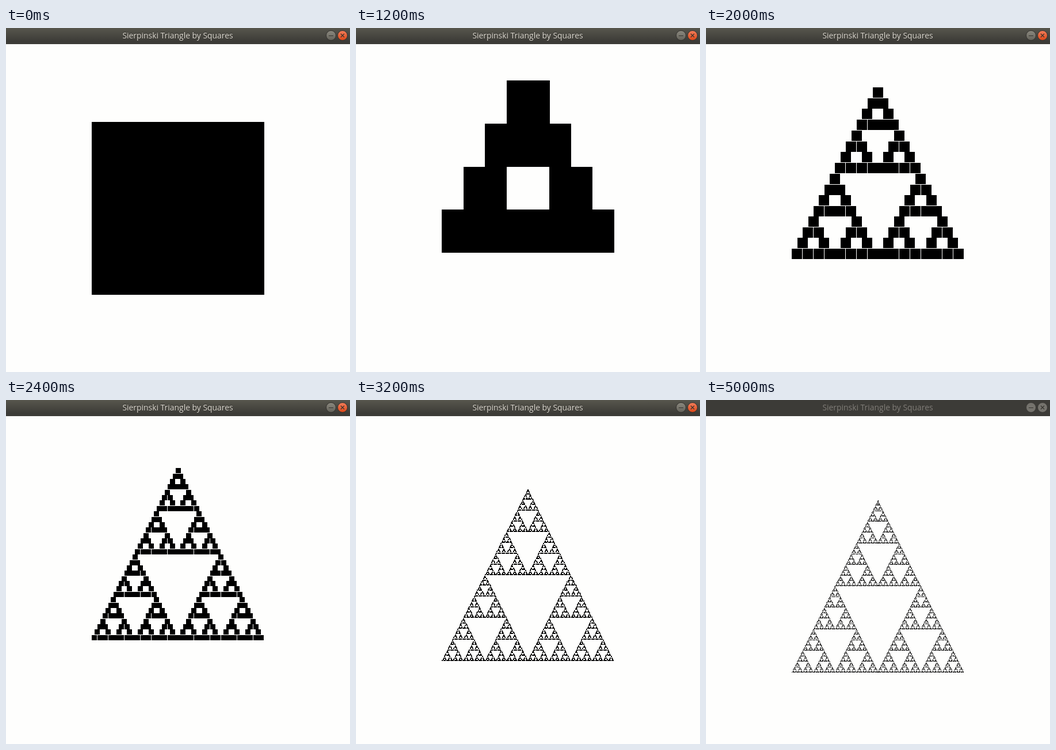
Animation, 598 px wide and 597 px high, one loop 5100 ms. Source, as an HTML page with a canvas:

```html
<!DOCTYPE html>
<html lang="en">
<head>
<meta charset="utf-8">
<title>Sierpinski Triangle by Squares</title>
<style>
  html, body { margin: 0; width: 100%; height: 100%; overflow: hidden; background: #fefefd; }
  canvas, svg { position: absolute; left: 0; top: 0; display: block; }
  text { font: 400 13.9px "Open Sans", "Noto Sans", sans-serif; text-anchor: middle; }
  .shade { fill: #2a2925; }
  .label { fill: #dfdbd2; }
  .disc { stroke: #32312d; }
  .sign { fill: none; stroke: #35342f; stroke-width: 1.2; }
  .idle .bar { fill: #3c3b37; }
  .idle .shade { fill: none; }
  .idle .label { fill: #807d78; }
  .idle .disc { fill: #75736d; stroke: #3a3935; }
</style>
</head>
<body>
<canvas id="stage" width="598" height="597"></canvas>
<svg id="titlebar" width="598" height="28">
  <defs>
    <linearGradient id="barFill" x2="0" y2="1">
      <stop offset="0" stop-color="#57564d"/>
      <stop offset=".83" stop-color="#3c3b37"/>
    </linearGradient>
    <linearGradient id="greyFill" x2="0" y2="1">
      <stop offset="0" stop-color="#8b897f"/>
      <stop offset="1" stop-color="#64625a"/>
    </linearGradient>
    <linearGradient id="redFill" x2="0" y2="1">
      <stop offset="0" stop-color="#f37f5c"/>
      <stop offset="1" stop-color="#dc4616"/>
    </linearGradient>
  </defs>
  <rect class="bar" width="598" height="28" fill="url(#barFill)"/>
  <text class="shade" x="298.5" y="17">Sierpinski Triangle by Squares</text>
  <text class="label" x="298.5" y="18">Sierpinski Triangle by Squares</text>
  <circle class="disc" cx="565" cy="13" r="8.5" fill="url(#greyFill)"/>
  <circle class="disc" cx="585" cy="13" r="8.5" fill="url(#redFill)"/>
  <path class="sign" d="M561 13.5h8M582 10l6 6m0-6l-6 6"/>
</svg>
<script>
  const LOOP = 5100, BLUR_AT = 5000;
  const LEVEL_STARTS = [0, 700, 1200, 1600, 2000, 2400, 2800, 3200, 4100];
  const SIDE = 300, DROP = 20;
  const CENTER = { x: 299, y: 313 };

  const ctx = document.getElementById("stage").getContext("2d");
  const titlebar = document.getElementById("titlebar");
  const startTime = performance.now();
  let shownLevel = -1;

  // Each split halves the squares and moves the figure; coordinates truncate toward the center.
  function drawLevel(level) {
    const rows = 2 ** level;
    const side = SIDE / rows;
    const size = Math.trunc(side);
    const top = DROP * level - SIDE + side / 2;
    ctx.fillStyle = "#fefefd";
    ctx.fillRect(0, 0, 598, 597);
    ctx.fillStyle = "#000";
    for (let row = 0; row < rows; row++) {
      const y = CENTER.y + Math.trunc(top + row * side);
      for (let col = 0; col <= row; col++) {
        if (col & (row - col)) continue; // keep odd binomials only
        const x = CENTER.x + Math.trunc((col - (row + 1) / 2) * side);
        ctx.fillRect(x, y, size, size);
      }
    }
  }

  function render() {
    const time = (performance.now() - startTime) % LOOP;
    const level = LEVEL_STARTS.findLastIndex(start => time >= start);
    if (level !== shownLevel) drawLevel(shownLevel = level);
    titlebar.classList.toggle("idle", time >= BLUR_AT);
    requestAnimationFrame(render);
  }
  render();
</script>
</body>
</html>
```
